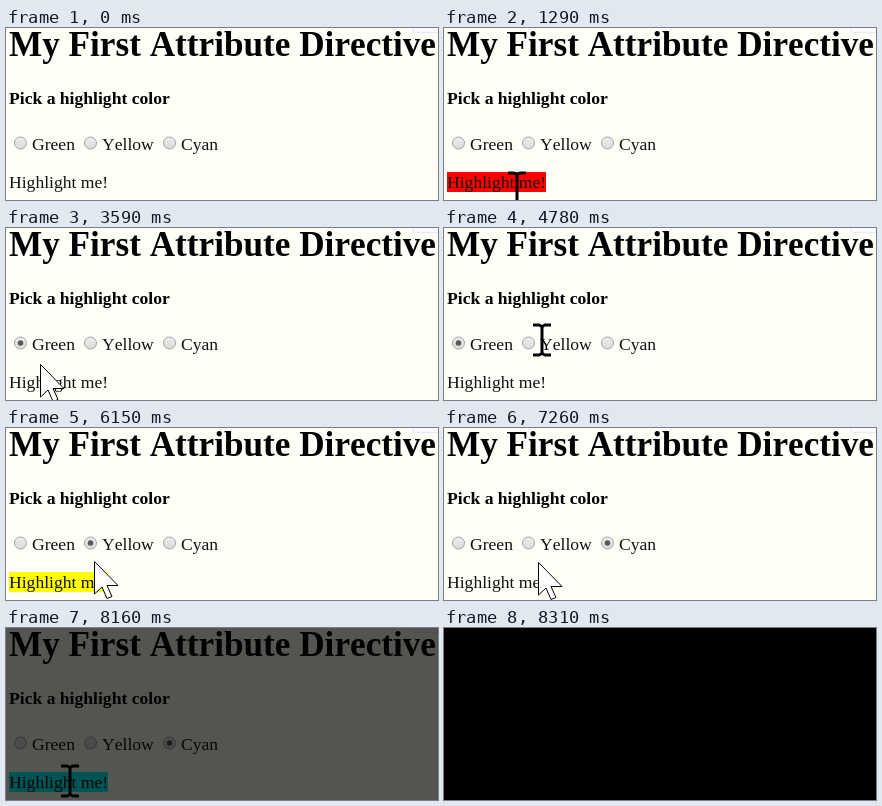
An HTML page that plays this animation: 432 by 172 pixels, repeating every 8810 ms.

```html
<!DOCTYPE html>
<html lang="en">
<head>
<meta charset="utf-8">
<title>Attribute Directive</title>
<style>
  html, body { margin: 0; width: 432px; height: 172px; overflow: hidden; background: #fffff8; }
  svg { display: block; }
  text { font: 17.6px "Liberation Serif", "Times New Roman", serif; font-kerning: none; fill: #111; }
  .bold { font-weight: bold; fill: #000; }
  .title { font-size: 35.2px; }
  .ring { fill: url(#face); stroke: #a6a6a6; }
  .hover .ring { stroke: #888; }
  .pressed .ring { fill: #c8c8c8; stroke: #777; }
  .dot { fill: #585858; visibility: hidden; }
  .checked .dot { visibility: visible; }
</style>
</head>
<body>
<svg width="432" height="172" viewBox="0 0 432 172">
  <defs>
    <linearGradient id="face" x2="0" y2="1">
      <stop stop-color="#eee"/><stop offset="1" stop-color="#dadada"/>
    </linearGradient>
  </defs>
  <rect x="406.5" y="-10" width="40" height="14.5" rx="3" fill="#fafaff" stroke="#e8e8f4"/>
  <text class="bold title" x="3" y="28">My First Attribute Directive</text>
  <text class="bold" x="3" y="76">Pick a highlight color</text>
  <g id="options"></g>
  <rect id="mark" x="3" y="144" width="99" height="20"/>
  <text x="3" y="160">Highlight me!</text>
  <g id="cursor">
    <path id="arrow" d="M.5 .5V33L8 26L13 37.5L18 35.5L13 24.5H24Z" fill="#fff" stroke="#000"/>
    <path id="beam" d="M-9-15H-3L0-13.5L3-15H9M0-14V14M-9 15H-3L0 13.5L3 15H9" fill="none" stroke="#000" stroke-width="3"/>
  </g>
  <rect id="shade" width="432" height="172"/>
</svg>
<script>
const LOOP = 8810, FADE_START = 7860, FADE_TIME = 450;
const PRESS_TIME = 190, HIGHLIGHT_LAG = 100, LABEL_GAP = 11.5;
const $ = id => document.getElementById(id);

// Each option's name is also its highlight color
const options = [
  { name: 'Green', x: 14.5, check: 3290 },
  { name: 'Yellow', x: 84.5, check: 5290 },
  { name: 'Cyan', x: 163.5, check: 6950 }
];
$('options').innerHTML = options.map(o => `<g>
  <circle class="ring" cx="${o.x}" cy="115" r="6"/>
  <circle class="dot" cx="${o.x}" cy="115" r="2.8"/>
  <text x="${o.x + LABEL_GAP}" y="122">${o.name}</text></g>`).join('');
options.forEach((o, i) => {
  o.group = $('options').children[i];
  o.labelWidth = o.group.querySelector('text').getComputedTextLength();
});

// Pointer moves: start, end, x, y; it rests between them
const moves = [
  [60, 660, 72, 160],
  [1290, 1590, 221, 140],
  [1820, 2660, 16, 115],
  [3290, 3590, 34, 136],
  [3750, 3900, 34, 148],
  [4200, 4780, 98, 112],
  [4780, 5000, 88, 113],
  [5290, 5830, 80, 154],
  [6030, 6150, 88, 133],
  [6150, 6850, 162, 113],
  [6950, 7260, 94, 134],
  [7260, 7560, 64, 153]
];

const clamp = u => Math.max(0, Math.min(1, u));
const easeOut = u => 1 - (1 - u) ** 2.4;

function pointer(t) {
  return moves.reduce(([px, py], [start, end, x, y]) => {
    const k = easeOut(clamp((t - start) / (end - start)));
    return [px + (x - px) * k, py + (y - py) * k];
  }, [286, 173]);
}

const inside = ([x, y], left, width, top, height) =>
  x >= left && x <= left + width && y >= top && y <= top + height;
const overLine = p => inside(p, 3, 99, 143.5, 21);
const overLabel = p => options.some(o => inside(p, o.x + LABEL_GAP, o.labelWidth, 106, 20));
const show = (id, on) => $(id).setAttribute('visibility', on ? 'visible' : 'hidden');

function draw(t) {
  const p = pointer(t);
  const chosen = options.filter(o => t >= o.check).pop();

  for (const o of options) {
    const list = o.group.classList;
    list.toggle('checked', o === chosen);
    list.toggle('pressed', t >= o.check - PRESS_TIME && t < o.check);
    list.toggle('hover', inside(p, o.x - 6.5, 13, 108, 14));
  }

  show('mark', overLine(pointer(t - HIGHLIGHT_LAG)));
  $('mark').setAttribute('fill', chosen ? chosen.name.toLowerCase() : 'red');

  const overText = overLine(p) || overLabel(p);
  show('beam', overText);
  show('arrow', !overText);
  $('cursor').setAttribute('transform', `translate(${p.map(Math.round)})`);

  $('shade').setAttribute('opacity', clamp((t - FADE_START) / FADE_TIME));
}

const start = performance.now();
function tick() {
  draw((performance.now() - start) % LOOP);
  requestAnimationFrame(tick);
}
tick();
</script>
</body>
</html>
```
